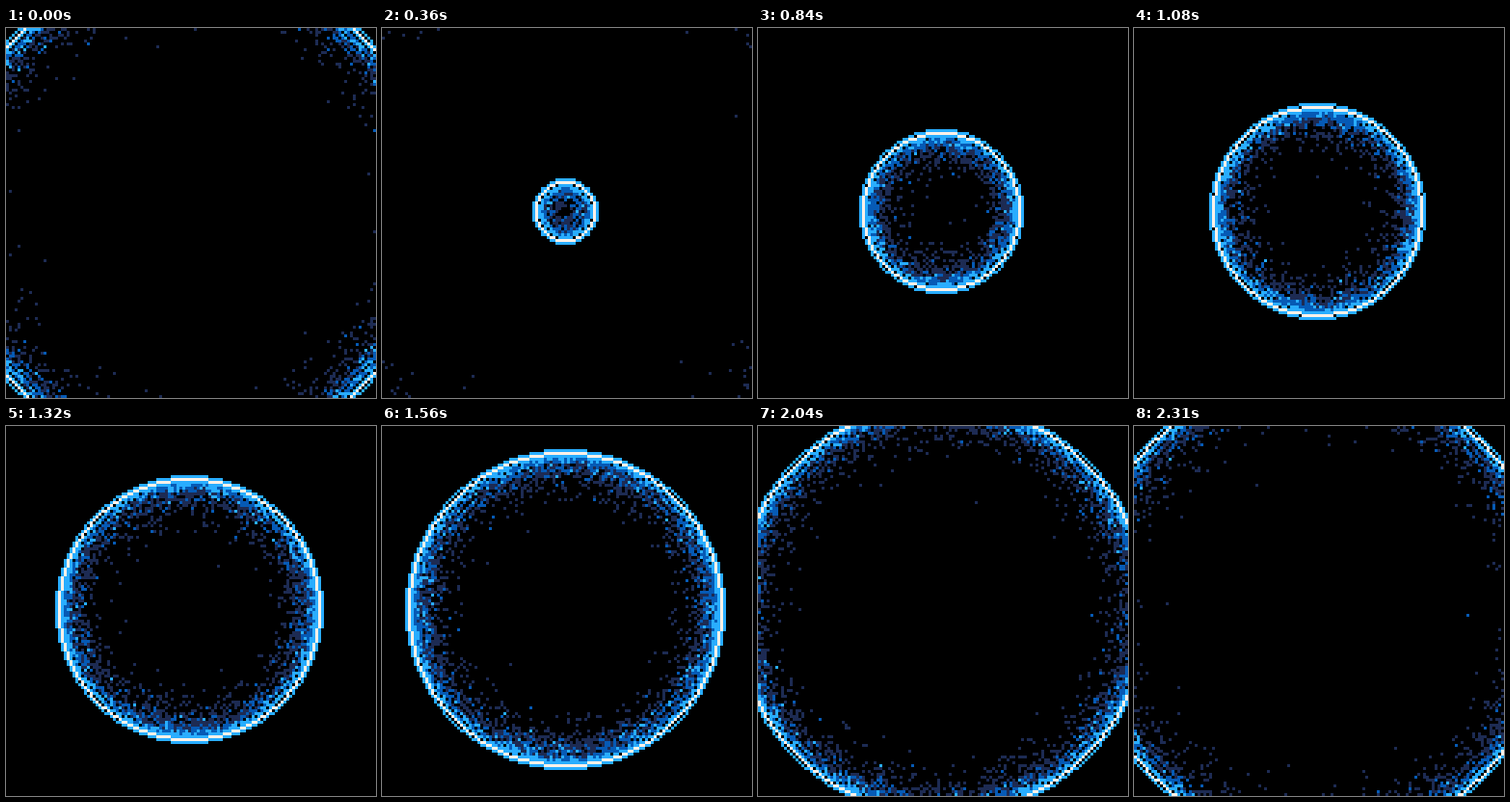
An HTML page with a canvas that plays this animation: 384x384 px, repeating every 2340 ms.

```html
<!DOCTYPE html>
<html lang="en">
<head>
<meta charset="utf-8">
<title>Expanding ring</title>
<style>
  html, body { margin: 0; height: 100%; overflow: hidden; background: #000; }
  canvas { display: block; width: 384px; height: 384px; image-rendering: pixelated; }
</style>
</head>
<body>
<canvas id="stage" width="128" height="128"></canvas>
<script>
const SIZE = 128, CENTER = 63, STEP_MS = 30, STEPS = 78;
const CYCLE = 80, PHASE = 77.38, SPEED = 1.1;

// Black, three fading blues, white; FADE is each one's chance to dim per step
const PALETTE = [[0, 0, 0], [29, 43, 83], [6, 90, 181], [41, 173, 255], [255, 241, 232]];
const FADE = [0, 0.28, 0.45, 0.52, 1];
const BLUE = 3, WHITE = 4;

const ctx = document.getElementById('stage').getContext('2d');
const cells = new Uint8Array(SIZE * SIZE);

let seed = 7;
function random() {
  seed = (seed + 0x6D2B79F5) | 0;
  let h = Math.imul(seed ^ (seed >>> 15), seed | 1);
  h ^= h + Math.imul(h ^ (h >>> 7), h | 61);
  return ((h ^ (h >>> 14)) >>> 0) / 4294967296;
}

function plot(dx, dy, color) {
  const x = CENTER + dx, y = CENTER + dy;
  if (x >= 0 && y >= 0 && x < SIZE && y < SIZE) cells[y * SIZE + x] = color;
}

// One-pixel circle, built from eight mirrored arcs
function circle(radius, color) {
  for (let y = 0; y <= radius; y++) {
    const x = Math.round(Math.sqrt(radius * radius - y * y));
    if (x < y) break;
    for (const [a, b] of [[x, y], [y, x]]) {
      plot(a, b, color);
      plot(-a, b, color);
      plot(a, -b, color);
      plot(-a, -b, color);
    }
  }
}

function advance(step) {
  for (let i = 0; i < cells.length; i++) {
    if (cells[i] && random() < FADE[cells[i]]) cells[i]--;
  }
  const radius = Math.floor(SPEED * ((step + PHASE) % CYCLE));
  circle(radius + 1, BLUE);
  circle(radius, WHITE);
}

function snapshot() {
  const image = ctx.createImageData(SIZE, SIZE);
  cells.forEach((c, i) => image.data.set([...PALETTE[c], 255], i * 4));
  return image;
}

// One earlier ring runs first so its embers are present at the start
const pictures = [];
for (let step = -77; step < STEPS; step++) {
  advance(step);
  if (step >= 0) pictures.push(snapshot());
}

const start = performance.now();
function draw(now) {
  const step = Math.floor(Math.max(0, now - start) / STEP_MS) % STEPS;
  ctx.putImageData(pictures[step], 0, 0);
  requestAnimationFrame(draw);
}
draw(start);
</script>
</body>
</html>
```
